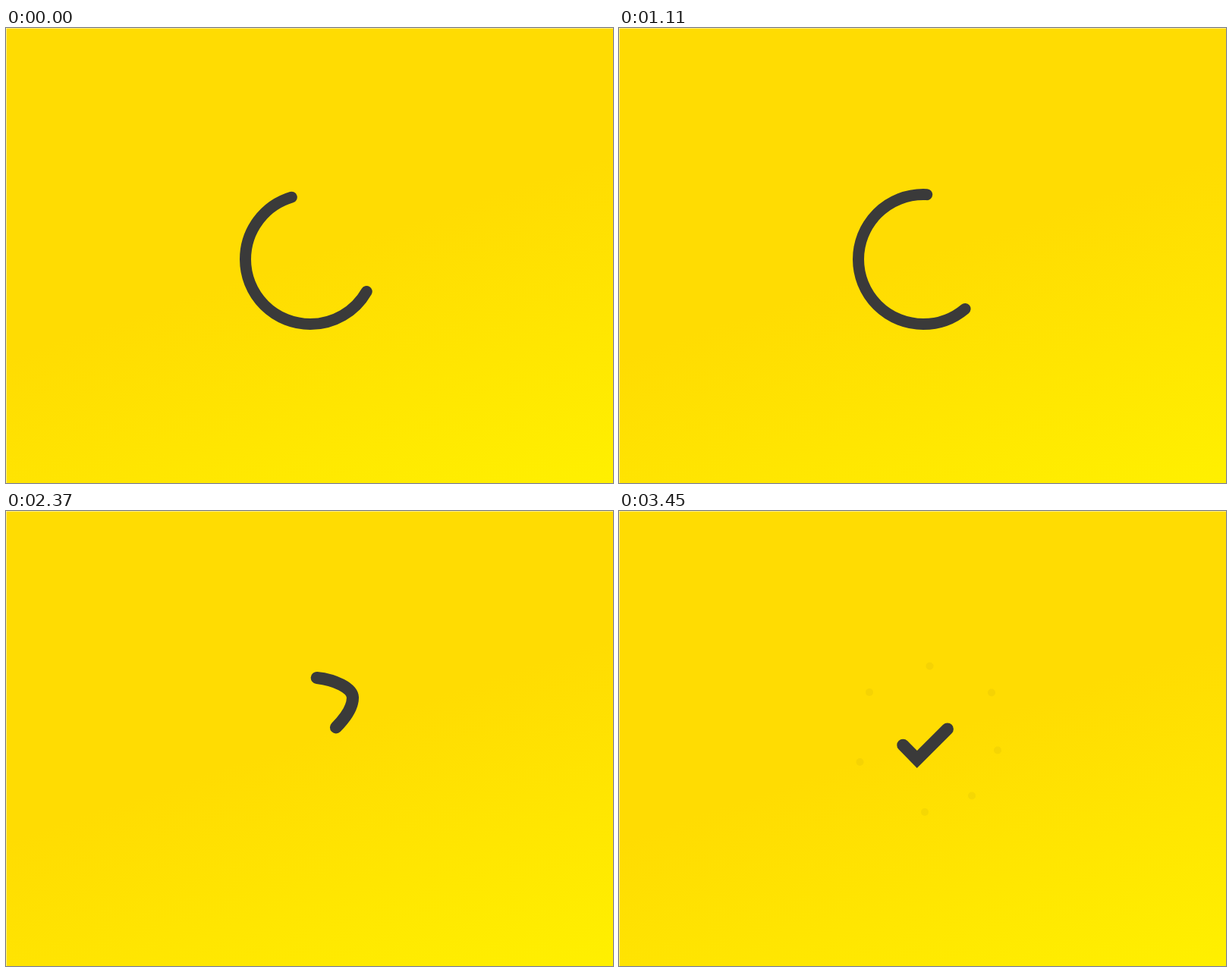
Animation, 800 px wide and 600 px high, one loop 3.81 s. Source, as an HTML page:

```html
<!DOCTYPE html>
<html lang="en">
<head>
<meta charset="utf-8">
<title>Loading to done</title>
<style>
  html, body { margin: 0; width: 100%; height: 100%; overflow: hidden; }
  body { background: linear-gradient(161.4deg, #ffdc02 50%, #fff000); }
  svg { display: block; width: 800px; height: 600px; }
  #line { fill: none; stroke: #3a3a3a; stroke-linecap: round; stroke-linejoin: miter; }
  #ring { fill: none; stroke: #3a3a3a; }
  #dots { fill: #3a3a3a; }
  .edge { fill: #fff; opacity: .5; }
</style>
</head>
<body>
<svg viewBox="0 0 800 600">
  <rect class="edge" width="1" height="600"/>
  <rect class="edge" width="800" height="1"/>
  <circle id="ring" cx="407.5" cy="300"/>
  <g id="dots"></g>
  <!-- two turns of the spinner, the hook, then the check mark -->
  <path id="line" d="M401 219.5
    a85.5 85.5 0 0 1 0 171 a85.5 85.5 0 0 1 0 -171
    a85.5 85.5 0 0 1 0 171 a85.5 85.5 0 0 1 0 -171
    C427 219.5 456.5 232 457 246 C457 259 447.3 273 434.3 286
    L392.8 327.5 L374.3 308.7"/>
</svg>
<script>
const LOOP = 3810, STEP = 30;
const HOOK_AT = 2190, BURST_AT = 2550, BURST_END = 3270;
const line = document.getElementById('line');
const ring = document.getElementById('ring');
const dotBox = document.getElementById('dots');

const turn = 2 * Math.PI * 85.5;
const arc = turn * 223 / 360;
const total = line.getTotalLength();
const check = Math.hypot(41.5, 41.5) + Math.hypot(18.5, 18.8);

// resting offsets from the burst centre
const outer = [[2, -95.5], [83.5, -60.5], [91.5, 15.5], [57.5, 75.5], [-4.5, 97], [-90, 31], [-77.5, -61]];
const inner = [[-10, -85], [67, -68], [84, -1], [65, 57.5], [9, 88], [-72.5, 40], [-76, -43]];

const clamp = v => Math.min(1, Math.max(0, v));
const mix = (a, b, p) => a + (b - a) * p;
const easeOut = (p, power) => 1 - Math.pow(1 - p, power);

function set(el, attrs) {
  for (const key in attrs) el.setAttribute(key, attrs[key]);
}

function makeDot([x, y], rest, start) {
  const el = document.createElementNS('http://www.w3.org/2000/svg', 'circle');
  el.setAttribute('r', 5);
  dotBox.append(el);
  return { el, x, y, rest, start };
}
const dots = [...outer.map(p => makeDot(p, .05, .31)), ...inner.map(p => makeDot(p, 0, .35))];

function drawLine(t) {
  let head, tail;
  if (t < HOOK_AT) {
    const angle = (342 + t * 20.018 / 30) % 360;
    head = turn * (1 + angle / 360);
    tail = head - arc;
  } else {
    const p = clamp((t - HOOK_AT) / (BURST_AT - HOOK_AT));
    head = mix(2 * turn + 3, total, easeOut(p, 1.15));
    tail = mix(2 * turn + 3 - arc, total - check, easeOut(p, 2.06));
  }
  const pop = 1 + .228 * Math.sin(Math.PI * clamp((t - BURST_AT) / (BURST_END - BURST_AT)));
  set(line, {
    'stroke-dasharray': `${head - tail} 9999`,
    'stroke-dashoffset': -tail,
    'stroke-width': mix(15, 16.1, clamp((t - HOOK_AT) / 180)),
    transform: `translate(402 308.3) scale(${pop}) translate(-402 -308.3)`
  });
}

function drawBurst(t) {
  const p = clamp((t - BURST_AT) / (BURST_END - BURST_AT));
  const size = easeOut(p, 2);
  set(ring, { r: 82.3 * size, 'stroke-width': 26.4 * (1 - p), opacity: p ? .22 * (1 - p) : 0 });
  for (const d of dots) {
    set(d.el, {
      cx: 407.5 + d.x * size,
      cy: 300 + d.y * size,
      opacity: p ? mix(d.start, d.rest, p) : 0
    });
  }
}

function render(ms) {
  const t = Math.floor(ms % LOOP / STEP) * STEP;
  drawLine(t);
  drawBurst(t);
}

const begin = performance.now();
function tick() {
  render(performance.now() - begin);
  requestAnimationFrame(tick);
}
tick();
</script>
</body>
</html>
```
